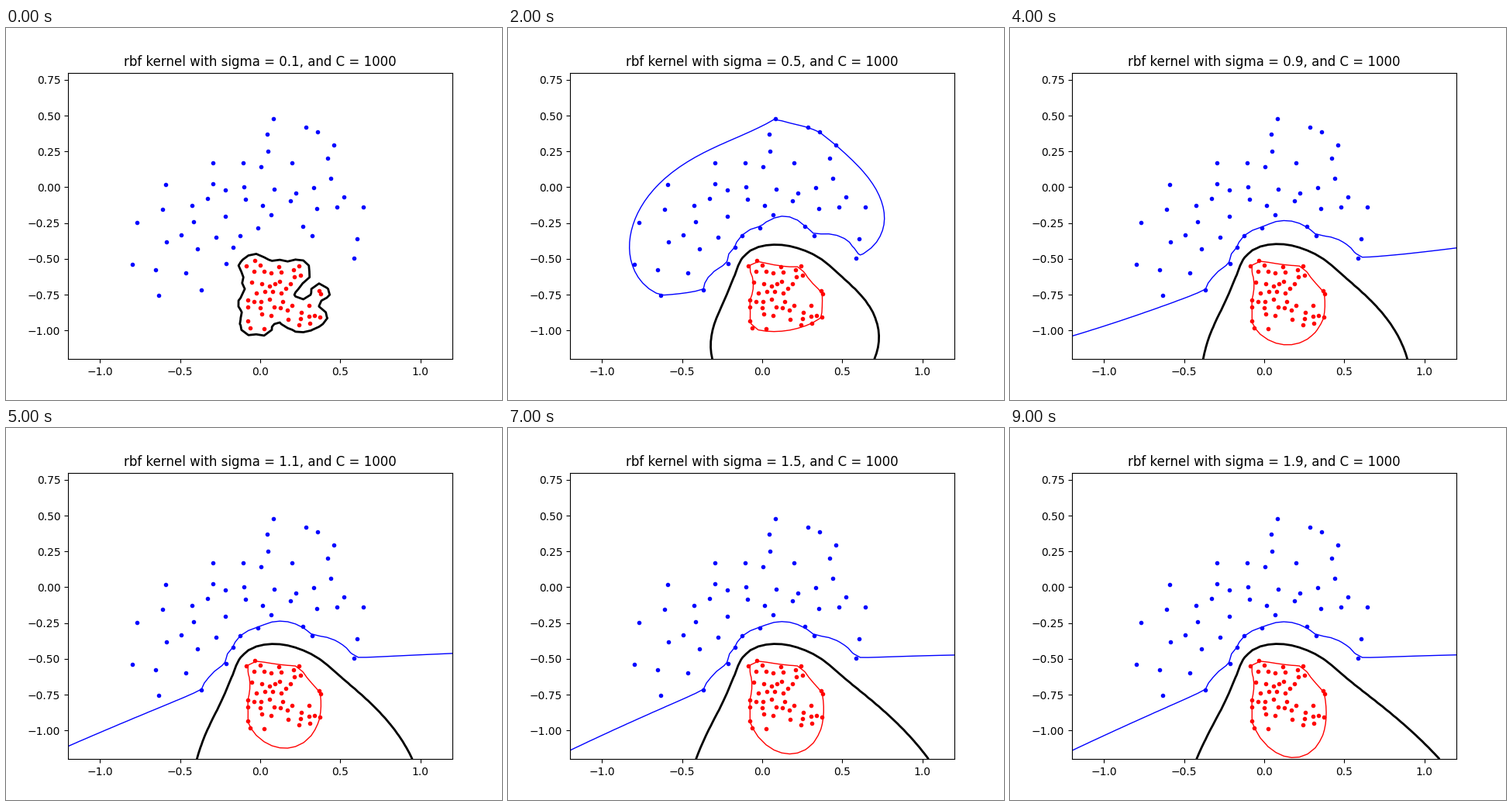
Animation of 640x480 px, one loop 9500 ms. Source, as a matplotlib script:

```python
import numpy as np
import matplotlib.pyplot as plt
from matplotlib.animation import FuncAnimation
from matplotlib.path import Path

C = 1000
FRAMES = 19
SAMPLES = 50
X_LIM, Y_LIM = (-1.2, 1.2), (-1.2, 0.8)

# Outermost samples of each class in stage pixels, clockwise
CRESCENT = [
    (345, 117), (387, 128), (402, 134), (423, 151), (461, 231), (453, 272),
    (449, 297), (395, 268), (383, 256), (325, 258), (302, 268), (293, 283),
    (284, 304), (252, 338), (197, 345), (163, 305), (169, 251), (206, 202),
    (267, 174),
]
BLOCK = [
    (310, 307), (321, 300), (352, 308), (378, 307), (380, 319), (367, 330),
    (369, 358), (391, 358), (404, 339), (406, 343), (405, 373), (392, 381),
    (378, 383), (364, 376), (342, 371), (333, 388), (315, 387), (312, 378),
    (312, 360), (312, 351), (317, 328),
]


def fill(outline, margin, rng, choices=4):
    """Add scattered samples inside the outline, favouring open space."""
    points = np.array(outline, float)
    shape = Path(points)
    low, high = points.min(axis=0), points.max(axis=0)
    around = margin * np.array([(1, 0), (-1, 0), (0, 1), (0, -1)])
    while len(points) < SAMPLES:
        spots = []
        while len(spots) < choices:
            spot = rng.uniform(low, high)
            if shape.contains_points(spot + around).all():
                spots.append(spot)
        room = [np.linalg.norm(points - s, axis=1).min() for s in spots]
        points = np.vstack((points, spots[np.argmax(room)]))
    return points


def to_data(pixels):
    """Convert stage pixels to axes coordinates."""
    px, py = pixels.T
    x = X_LIM[0] + (px - 80) / 496 * (X_LIM[1] - X_LIM[0])
    y = Y_LIM[0] + (427.2 - py) / 369.6 * (Y_LIM[1] - Y_LIM[0])
    return np.column_stack((x, y))


def kernel(p, q, sigma):
    dist = np.linalg.norm(p[:, None] - q[None], axis=2)
    return np.exp(-dist / (2 * sigma ** 2))


def train(points, target, sigma, steps=60):
    """Solve the SVM dual with a primal-dual interior point method."""
    n = len(target)
    q = np.outer(target, target) * kernel(points, points, sigma)
    alpha, slack, bias = np.ones(n), np.ones(n), 0.0
    system = np.zeros((n + 1, n + 1))
    system[:n, n] = system[n, :n] = target
    for _ in range(steps):
        gap = alpha @ slack / n
        if gap < 1e-10:
            break
        mu = 0.1 * gap
        system[:n, :n] = q + np.diag(slack / alpha)
        rhs = np.append(1 - q @ alpha - bias * target + mu / alpha,
                        -target @ alpha)
        step = np.linalg.solve(system, rhs)
        d_alpha = step[:n]
        d_slack = mu / alpha - slack - slack / alpha * d_alpha
        size = 1.0
        for value, delta in ((alpha, d_alpha), (slack, d_slack)):
            down = delta < 0
            if down.any():
                size = min(size, 0.99 * np.min(-value[down] / delta[down]))
        alpha = alpha + size * d_alpha
        slack = slack + size * d_slack
        bias += size * step[n]
    return alpha * target, bias


rng = np.random.default_rng(5)
blue = to_data(fill(CRESCENT, 9, rng))
red = to_data(fill(BLOCK, 4, rng))
points = np.vstack((blue, red))
target = np.repeat([1.0, -1.0], SAMPLES)

xs, ys = np.linspace(*X_LIM, 50), np.linspace(*Y_LIM, 50)
grid = np.stack(np.meshgrid(xs, ys), axis=-1).reshape(-1, 2)

fig, ax = plt.subplots(figsize=(6.4, 4.8), dpi=100)


def draw(i):
    sigma = (i + 1) / 10
    weights, bias = train(points, target, sigma)
    field = (kernel(grid, points, sigma) @ weights + bias).reshape(50, 50)
    ax.clear()
    ax.plot(*blue.T, "b.")
    ax.plot(*red.T, "r.")
    ax.contour(xs, ys, field, (-1, 0, 1),
               colors=("red", "black", "blue"), linewidths=(1, 2, 1))
    ax.set(xlim=X_LIM, ylim=Y_LIM,
           title=f"rbf kernel with sigma = {sigma:.1f}, and C = {C}")
    return []


anim = FuncAnimation(fig, draw, frames=FRAMES, interval=500,
                     init_func=lambda: [], repeat=True, repeat_delay=0)
plt.show()
```
